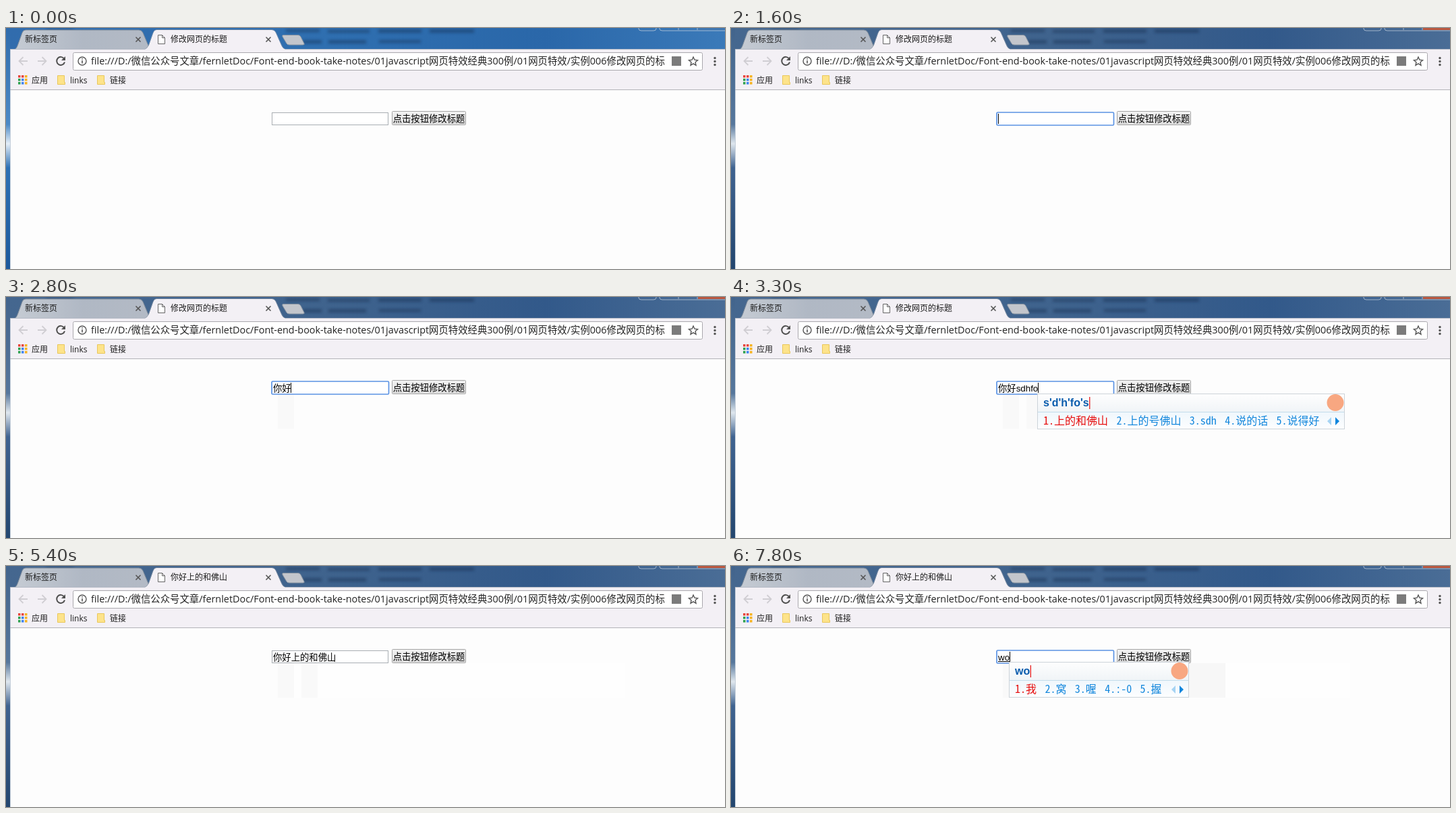
Animation of 1066x357 px, one loop 8000 ms. Source, as an HTML page:

```html
<!DOCTYPE html>
<html lang="zh-CN">
<head>
<meta charset="utf-8">
<title>修改网页的标题</title>
<style>
html, body { margin: 0; width: 100%; height: 100%; overflow: hidden; background: #fdfdfd; }
svg { display: block; width: 1066px; height: 357px; }
text { font-family: "Open Sans", "Noto Sans CJK SC", "Noto Sans CJK", sans-serif; font-size: 12px; fill: #1c1c1c; white-space: pre; }
.url { font-size: 14.4px; fill: #222; }
.form { font-family: "Liberation Sans", "Noto Sans CJK SC", "Noto Sans CJK", sans-serif; font-size: 13.333px; fill: #000; }
.pinyin { font-family: "Liberation Sans", sans-serif; font-size: 16px; font-weight: bold; fill: #0a5cad; }
.cand { font-family: "Noto Sans Mono CJK SC", "Noto Sans CJK SC", "Noto Sans CJK", monospace; font-size: 16px; font-weight: 300; fill: #1186dc; }
.cand.first { fill: #e60d0d; }
.line { fill: none; stroke: #555; stroke-width: 1.6; }
</style>
</head>
<body>
<svg viewBox="0 0 1066 357">
  <defs>
    <linearGradient id="sky"><stop offset="0"/><stop offset=".45"/><stop offset=".75"/><stop offset="1"/></linearGradient>
    <linearGradient id="edge" x2="0" y2="1"><stop offset="0"/><stop offset=".4"/><stop offset=".48"/><stop offset=".58"/><stop offset="1"/></linearGradient>
    <linearGradient id="idleTab"><stop offset="0" stop-color="#c5cbd3"/><stop offset=".5" stop-color="#b0b8c4"/><stop offset="1" stop-color="#b3bac5"/></linearGradient>
    <linearGradient id="face" x2="0" y2="1"><stop offset="0"/><stop offset="1"/></linearGradient>
    <linearGradient id="head" x2="0" y2="1"><stop offset="0" stop-color="#fefefe"/><stop offset="1" stop-color="#f0f4f7"/></linearGradient>
    <linearGradient id="foot" x2="0" y2="1"><stop offset="0" stop-color="#f0f7fc"/><stop offset="1" stop-color="#fdfeff"/></linearGradient>
    <filter id="soft" x="-20%" y="-100%" width="140%" height="300%"><feGaussianBlur stdDeviation="2"/></filter>
  </defs>

  <rect width="1066" height="357" fill="#fdfdfd"/>
  <rect width="1066" height="32" fill="url(#sky)"/>
  <rect width="6" height="357" fill="url(#edge)"/>
  <g filter="url(#soft)" fill="#142c48" opacity=".45">
    <path d="M415 2h50v4h-50zM477 3h62v4h-62zM552 2h64v5h-64zM628 2h66v5h-66zM440 18h28v5h-28zM478 18h56v5h-56zM553 18h62v4h-62zM60 2h40v3h-40z"/>
  </g>
  <path d="M938 0v1q0 3 4 3h18q4 0 4-3V0M969 0v1q0 3 4 3h93M997 0v3M1025 0v3" fill="none" stroke="#c3cfdd" stroke-opacity=".75"/>
  <rect id="closeBox" x="1026" width="40" height="3"/>

  <path d="M13 31.500Q16 30 17.500 25L24 7Q25.500 3 29 3H197Q201 3 203 7L211 26Q212 30 215 31.500Z" fill="url(#idleTab)" stroke="#7f8c9b"/>
  <path d="M6 31H207Q210 30 212 25L218 8Q219.500 3 223 3H394Q398 3 400 7L408 25Q410 30 413 31H1066V92H6Z" fill="#f3f0f5"/>
  <path d="M6 31.500H206Q209.500 30 211.500 25L217.500 8Q219.500 2.500 223 2.500H394Q398.500 2.500 400.500 7L408.500 25Q410.500 30 414 31.500H1066" fill="none" stroke="#8a97a6" stroke-opacity=".6"/>
  <path d="M411 10.500H433Q436 10.500 437 13L442 23Q443 25 440 25H420Q417 25 416 23L410 13Q409 10.500 411 10.500Z" fill="#c3c6cc" stroke="#8793a1"/>
  <path d="M6 91.500H1066" stroke="#b3b3b8"/>
  <path d="M6.500 32V357" stroke="#9fb0c2" stroke-opacity=".6"/>

  <text x="28" y="21">新标签页</text>
  <text id="title" x="244" y="21"></text>
  <path class="line" d="M192.500 13.500l7 7m0-7l-7 7M385.500 13.500l7 7m0-7l-7 7"/>
  <path d="M225.500 10.500h6l4 4v9h-10zM231.500 10.500v4h4" fill="#fff" stroke="#666"/>

  <g fill="none" stroke="#d0ced3" stroke-width="1.800">
    <path d="M32 49H20M25.500 43l-6 6 6 6M47 49h12M53.500 43l6 6-6 6"/>
  </g>
  <path d="M86.200 45.500A6 6 0 1 0 87 50.500" fill="none" stroke="#505050" stroke-width="2"/>
  <path d="M88 42v6h-6z" fill="#505050"/>

  <rect x="99.500" y="36.500" width="933" height="26" rx="2" fill="#fff" stroke="#aaa8ad"/>
  <circle class="line" cx="113" cy="49" r="6" style="stroke-width:1.400"/>
  <path d="M113 48v4.500M113 45v1.600" stroke="#555" stroke-width="1.600"/>
  <text class="url" x="126" y="54">file:///D:/微信公众号文章/fernletDoc/Font-end-book-take-notes/01javascript网页特效经典300例/01网页特效/实例006修改网页的标</text>
  <rect x="987" y="42" width="14" height="14" fill="#7b7b7b"/>
  <path class="line" style="stroke-width:1.400" d="M1019 43l1.900 4.200 4.600.5-3.500 3 1 4.500-4-2.400-4 2.400 1-4.500-3.500-3 4.600-.5z"/>
  <g fill="#555"><circle cx="1051" cy="44.500" r="1.700"/><circle cx="1051" cy="49.500" r="1.700"/><circle cx="1051" cy="54.500" r="1.700"/></g>

  <g id="apps"></g>
  <text x="38" y="82">应用</text>
  <g fill="#fde38a" stroke="#e9c75c"><path d="M76.500 70.500h10v10h1v3h-11zM135.500 70.500h10v10h1v3h-11z"/></g>
  <text x="95" y="82">links</text>
  <text x="154" y="82">链接</text>

  <g id="traces"></g>
  <rect x="394.500" y="125.500" width="172" height="18" fill="#fff" stroke="#a9aeb3"/>
  <rect id="ring" x="394" y="125" width="173.500" height="19" rx="1.500" fill="#fff" stroke="#5b93e4" stroke-width="1.700"/>
  <rect id="selection" y="127" height="15" fill="#3390ff"/>
  <text id="field" class="form" x="396" y="139.500"></text>
  <rect id="underline" y="141" height="1"/>
  <rect id="caret" y="127" width="1" height="15"/>

  <rect id="button" x="572.500" y="123.500" width="109" height="20" rx="1" fill="url(#face)"/>
  <text id="label" class="form" x="573.700" y="139">点击按钮修改标题</text>
  <g id="popup"></g>
</svg>
<script>
const $ = id => document.getElementById(id);
const LOOP = 8000, FIELD_X = 396;
const rect = (x, y, w, h, fill) => `<rect x="${x}" y="${y}" width="${w}" height="${h}" fill="${fill}"/>`;
const put = (id, attrs) => Object.entries(attrs).forEach(([k, v]) => $(id).setAttribute(k, v));
const show = (id, on) => put(id, { visibility: on ? 'visible' : 'hidden' });
const shade = (id, colors) => colors.forEach((c, i) => $(id).children[i].setAttribute('stop-color', c));

const themes = {
  bright: {
    sky: ['#316cad', '#2f6fb0', '#2a67a9', '#3b7ab9'],
    edge: ['#2f6cac', '#4c8ac6', '#e4eef7', '#2c70b4', '#1d599c'],
    close: '#3e76b0'
  },
  dull: {
    sky: ['#45678f', '#3f638d', '#32598a', '#4a6d96'],
    edge: ['#42648c', '#56779c', '#dfe7ee', '#3f6390', '#23466f'],
    close: '#b9573f'
  }
};
const faces = {
  normal: ['#f3f3f3', '#dcdcdc', '#a6a6a6'],
  hover: ['#f2f2f2', '#dadada', '#777'],
  pressed: ['#dedede', '#e6e6e6', '#777']
};

const popup = (x, right, pinyin, words, y = 142, caret = '#e60d0d') =>
  ({ x, right, pinyin, words: words.split(' '), y, caret });

const firstTrace = [[403, 427, '#f9f9f9']];
const bothTraces = [...firstTrace, [438, 462, '#f9f9f9']];
const cleared = [[427, 438, '#fefefe'], [462, 917, '#fefefe'], ...bothTraces];
const longWords = '上的和佛山 上的号佛山 sdh 说的话 说得好';

// Each entry changes only the listed parts of the state.
const timeline = [
  [0, { theme: 'bright', face: 'normal', title: '修改网页的标题', text: '', focus: false,
        caret: false, composing: false, select: null, popup: null, traces: [] }],
  [200, { face: 'hover' }],
  [300, { face: 'normal' }],
  [600, { theme: 'dull' }],
  [700, { focus: true, caret: true }],
  [1100, { caret: false }],
  [1600, { caret: true }],
  [2000, { text: 'n', composing: true, popup: popup(404, 714, 'n', '你 那个 年 能 你们的') }],
  [2100, { popup: popup(404, 714, 'ni', '你 你们 呢 泥 你好啊') }],
  [2300, { text: 'nih', traces: [[404, 412, '#f9f9f9']],
           popup: popup(412, 812, "ni'h", '你好 你会 霓虹 你哈 字符画：你好', 142, '#0a5cad') }],
  [2500, { text: 'niha', traces: firstTrace,
           popup: popup(420, 810, "ni'hao", '你好 拟好 你号 泥 字符画：你好') }],
  [2700, { text: 'nihao' }],
  [2800, { text: '你好', composing: false, popup: null }],
  [3100, { text: '你好s', popup: popup(429, 740, "s'd", '是的 上的 山 谁 sd', 143) }],
  [3200, { text: '你好sdh', traces: bothTraces,
           popup: popup(443, 898, "s'd'h'f", '上的和佛 上的号佛 sdh 说的话 说得好', 143) }],
  [3300, { text: '你好sdhfo', popup: popup(454, 910, "s'd'h'fo's", longWords, 143) }],
  [3400, { text: '你好sdhfos', popup: popup(461, 917, "s'd'h'fo's", longWords, 143) }],
  [3600, { text: '你好上的和佛山', popup: null, traces: cleared }],
  [4100, { caret: false }],
  [4600, { caret: true, face: 'hover' }],
  [4900, { focus: false, caret: false, face: 'pressed' }],
  [5000, { face: 'hover' }],
  [5200, { title: '你好上的和佛山' }],
  [5400, { face: 'normal' }],
  [6200, { focus: true, caret: true }],
  [6300, { caret: false, select: 3 }],
  [6400, { select: 0 }],
  [7300, { text: '', select: null, caret: true }],
  [7600, { text: 'w', composing: true, popup: popup(404, 733, 'w', '我 我们 为什么 无 五月') }],
  [7800, { text: 'wo', popup: popup(412, 679, 'wo', '我 窝 喔 :-0 握'),
           traces: [...cleared, [679, 733, '#f7f7f7']] }]
];

const wordWidth = word => [...word].reduce((sum, c) => sum + (c.charCodeAt(0) > 255 ? 16 : 8), 0);

function popupMarkup(p) {
  const { x, y, right } = p, w = right - x;
  let cx = x + 9;
  const words = p.words.map((word, i) => {
    const cls = i ? 'cand' : 'cand first';
    const out = `<text class="${cls}" x="${cx}" y="${y + 46}">${i + 1}.</text>` +
      `<text class="${cls}" x="${cx + 16}" y="${y + 46}">${word}</text>`;
    cx += 16 + wordWidth(word) + 12.4;
    return out;
  }).join('');
  const arrowY = y + 41;
  return rect(x, y, w, 28, 'url(#head)') + rect(x, y + 28, w, 25, 'url(#foot)') +
    `<path d="M${x} ${y + 27.5}h${w}" stroke="#c3dceb"/>` +
    `<rect x="${x + .5}" y="${y + .5}" width="${w - 1}" height="52" fill="none" stroke="#ccd3d9"/>` +
    `<circle cx="${right - 14}" cy="${y + 13.5}" r="12.5" fill="#f8a781"/>` +
    `<text id="pinyin" class="pinyin" x="${x + 9}" y="${y + 19}">${p.pinyin}</text>` +
    `<rect id="imeCaret" y="${y + 5}" width="1.2" height="18" fill="${p.caret}"/>` + words +
    `<path d="M${right - 20} ${arrowY - 6}v12l-6-6z" fill="#a5d3f3"/>` +
    `<path d="M${right - 14} ${arrowY - 6}v12l6-6z" fill="#0f86dd"/>`;
}

function render(s) {
  const theme = themes[s.theme], [top, bottom, border] = faces[s.face], field = $('field');
  shade('sky', theme.sky);
  shade('edge', theme.edge);
  put('closeBox', { fill: theme.close });
  shade('face', [top, bottom]);
  put('button', { stroke: border });
  put('label', { x: s.face === 'pressed' ? 574.7 : 573.7 });
  $('title').textContent = s.title;

  field.textContent = s.text;
  const selected = s.select !== null;
  const width = field.getComputedTextLength();
  const from = selected ? field.getSubStringLength(0, s.select) || 0 : 0;
  field.innerHTML = selected
    ? s.text.slice(0, s.select) + `<tspan fill="#fff">${s.text.slice(s.select)}</tspan>` : s.text;
  put('selection', { x: FIELD_X + from, width: width - from });
  put('underline', { x: FIELD_X, width });
  put('caret', { x: Math.floor(FIELD_X + width) });
  show('selection', selected);
  show('underline', s.composing);
  show('caret', s.caret);
  show('ring', s.focus);

  $('traces').innerHTML = s.traces.map(([a, b, fill]) => rect(a, 144, b - a, 51, fill)).join('');
  $('popup').innerHTML = s.popup ? popupMarkup(s.popup) : '';
  if (s.popup) put('imeCaret', { x: s.popup.x + 9.5 + $('pinyin').getComputedTextLength() });
}

const [red, green, blue, yellow] = ['#e8453c', '#2fa24f', '#3f83f0', '#f6b320'];
$('apps').innerHTML = [red, red, yellow, green, blue, yellow, green, blue, yellow]
  .map((c, i) => rect(18 + i % 3 * 5, 70 + Math.floor(i / 3) * 5, 3.5, 3.5, c)).join('');

const start = performance.now();
let shown = -1;
function tick() {
  const t = (performance.now() - start) % LOOP;
  const step = timeline.filter(([at]) => at <= t).length;
  if (step !== shown) {
    render(Object.assign({}, ...timeline.slice(0, step).map(entry => entry[1])));
    shown = step;
  }
  requestAnimationFrame(tick);
}
tick();
</script>
</body>
</html>
```
